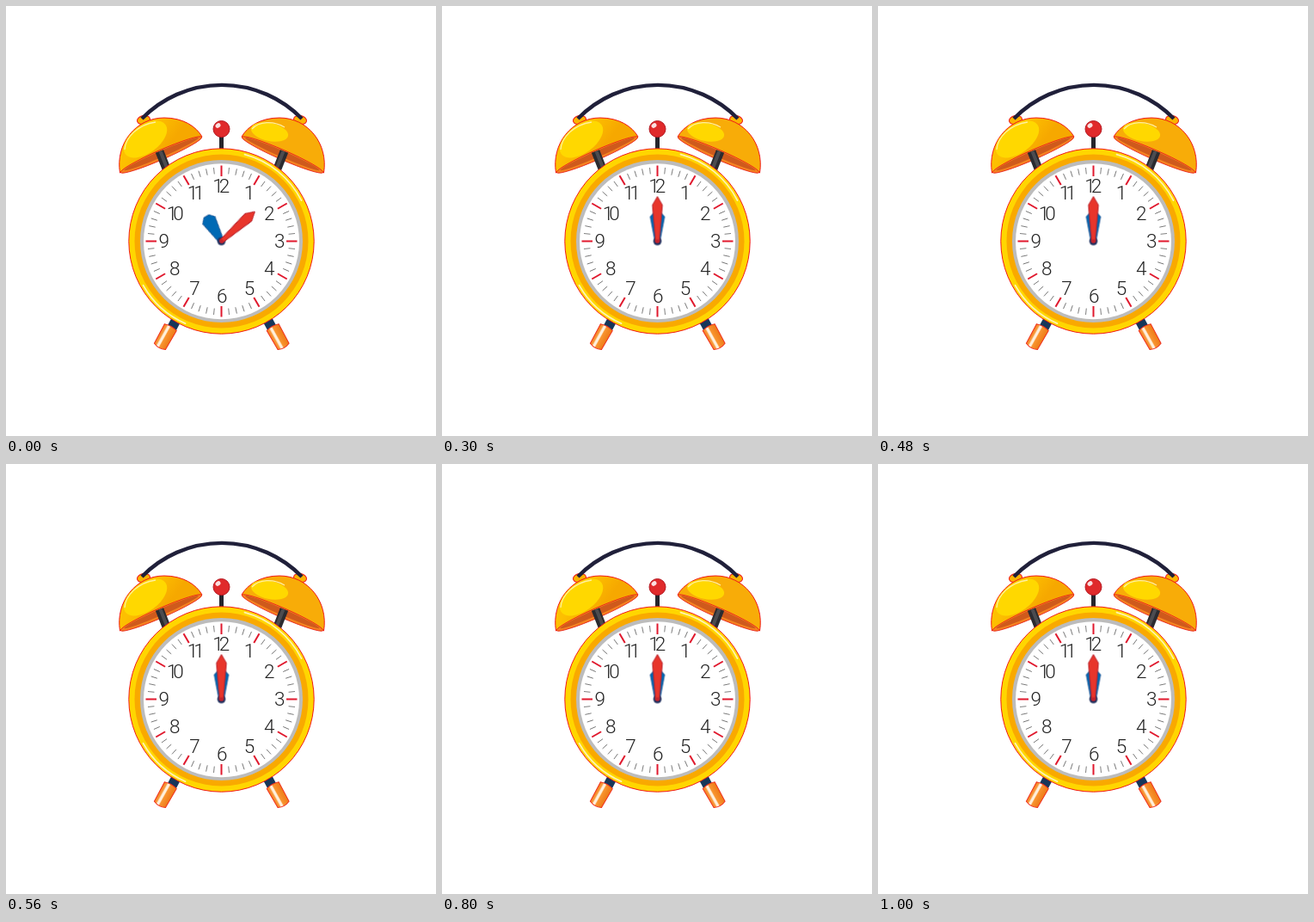
An HTML page for the animation above (1.2 s loop, 500x500 px).

```html
<!DOCTYPE html>
<html lang="en">
<head>
<meta charset="utf-8">
<title>Alarm clock</title>
<style>
  html, body { margin: 0; width: 100%; height: 100%; overflow: hidden; background: #fff; }
  svg { display: block; width: 100vw; height: 100vh; }
  text { font: 300 22.5px Roboto, "Open Sans", sans-serif; fill: #222; text-anchor: middle; }

  .minute { animation: minute 1200ms infinite; }
  .hour { animation: hour 1200ms infinite; }
  .bells { animation: shake 1200ms infinite; }

  @keyframes minute {
    0% { transform: rotate(48.5deg); animation-timing-function: steps(15); }
    25%, 100% { transform: rotate(360deg); }
  }
  @keyframes hour {
    0% { transform: rotate(-31deg); animation-timing-function: steps(15); }
    25%, 100% { transform: rotate(0deg); }
  }
  /* a swing every 40 ms, drawn in 20 ms steps */
  @keyframes shake {
    0%, 25% { transform: translateX(0); animation-timing-function: steps(2); }
    28.3333%, 35%, 41.6666%, 48.3333%, 55%, 61.6666%, 68.3333%, 75% {
      transform: translateX(-10px); animation-timing-function: steps(2);
    }
    31.6666%, 38.3333%, 45%, 51.6666%, 58.3333%, 65%, 71.6666%, 78.3333% {
      transform: translateX(10px); animation-timing-function: steps(2);
    }
    81.6666% { transform: translateX(-10px); animation-timing-function: steps(1); }
    83.3333%, 100% { transform: translateX(0); }
  }
</style>
</head>
<body>
<svg viewBox="0 0 500 500">
  <defs>
    <linearGradient id="metal">
      <stop offset="0" stop-color="#f47a1c"/>
      <stop offset=".2" stop-color="#f89a3c"/>
      <stop offset=".3" stop-color="#fff0dc"/>
      <stop offset=".42" stop-color="#fff0dc"/>
      <stop offset=".5" stop-color="#f89530"/>
      <stop offset="1" stop-color="#ee7a16"/>
    </linearGradient>
    <linearGradient id="gold" gradientUnits="userSpaceOnUse" x1="152" y1="142" x2="200" y2="178">
      <stop offset=".2" stop-color="#fdc000"/>
      <stop offset=".7" stop-color="#f6a800"/>
    </linearGradient>
    <path id="dome" d="M132.500 194C127 160 151 130 184 130C206 130 221 140 228 152Z"/>
    <g id="rim" transform="rotate(-23.6 180.5 173)">
      <ellipse cx="180.5" cy="173" rx="51.5" ry="5.6" fill="#f58220" stroke="#e8201c" stroke-width=".8"/>
      <ellipse cx="181" cy="172.2" rx="47" ry="3.6" fill="#cf5a1c"/>
    </g>
    <ellipse id="knob" cx="160" cy="132.5" rx="7.600" ry="5" transform="rotate(-12 160 132.5)"
      fill="#fbb400" stroke="#f01818"/>
    <g id="post">
      <path d="M178.500 169L188 193" stroke="#2b2b30" stroke-width="10"/>
      <path d="M179.500 169L188.500 192" stroke="#4c4c50" stroke-width="4"/>
    </g>
    <path id="neck" d="M200 361L192.500 375" stroke="#17375a" stroke-width="11.500"/>
    <path id="cap" d="M-8 -13Q0 -15.500 8 -13L7.500 12.500Q0 16 -7.500 12.500Z"/>
  </defs>

  <g class="bells" fill="none">
    <use href="#knob"/>
    <use href="#knob" transform="matrix(-1 0 0 1 502 0)"/>
    <path d="M158 131A130 130 0 0 1 344 131" stroke="#20203a" stroke-width="4.400"/>

    <use href="#dome" fill="url(#gold)" stroke="#f01818"/>
    <ellipse cx="162" cy="155" rx="29" ry="16" transform="rotate(-36 162 155)" fill="#ffd800"/>
    <path d="M138 167C139 153 153 138 174 135" stroke="#fff0a0" stroke-width="1.300"/>
    <use href="#rim"/>

    <g transform="matrix(-1 0 0 1 502 0)">
      <use href="#dome" fill="#f8ac08" stroke="#f01818"/>
      <use href="#rim"/>
    </g>
    <ellipse cx="306.500" cy="146.500" rx="22" ry="10.500" transform="rotate(12 306.500 146.500)" fill="#ffd800"/>
    <path d="M286 143C294 134 311 133 324 141" stroke="#fff0a0" stroke-width="1.300"/>
  </g>

  <use href="#post"/>
  <use href="#post" transform="matrix(-1 0 0 1 502 0)"/>

  <path d="M250.500 150V167" stroke="#25252c" stroke-width="5"/>
  <circle cx="250.500" cy="143" r="9.500" fill="#e02a2b" stroke="#b3161f"/>
  <ellipse cx="246.500" cy="139" rx="3.200" ry="2.500" fill="#fff" opacity=".85" transform="rotate(-35 246.500 139)"/>

  <use href="#neck"/>
  <use href="#neck" transform="matrix(-1 0 0 1 502 0)"/>
  <g fill="url(#metal)" stroke="#f02a1c" stroke-width=".9">
    <use href="#cap" transform="translate(185 385) rotate(29)"/>
    <use href="#cap" transform="translate(316.500 385) rotate(-29)"/>
  </g>

  <g transform="translate(250.500 273.500)">
    <circle r="107.700" fill="#ffd600" stroke="#f01818"/>
    <circle r="101" fill="#f9a900"/>
    <g fill="none" stroke="#fff3b0" stroke-width="1.800" stroke-linecap="round">
      <path d="M27 -100.800A104.400 104.400 0 0 1 93 -47.400"/>
      <path d="M-42 95.600A104.400 104.400 0 0 1 -91 51.200"/>
    </g>
    <circle r="94.500" fill="#bcbcbc"/>
    <circle cy=".3" r="90.500" fill="#fff"/>
    <g id="dial"></g>
    <g class="hour">
      <path d="M-3.500 -34H3.500L8.400 -28.500L3 0H-3L-8.400 -28.500Z" fill="#0069b4" stroke="#1b4f8f" stroke-width=".8"/>
    </g>
    <circle r="4.800" fill="#23315f"/>
    <g class="minute">
      <path d="M0 -52L5.800 -42L2 1H-2L-5.800 -42Z" fill="#e8352b" stroke="#b8202a"/>
    </g>
    <circle r="2.300" fill="#c4232e"/>
  </g>
</svg>
<script>
  const dial = document.getElementById("dial");

  function add(tag, attrs, label = "") {
    const node = document.createElementNS("http://www.w3.org/2000/svg", tag);
    for (const key in attrs) node.setAttribute(key, attrs[key]);
    node.textContent = label;
    dial.append(node);
  }

  for (let i = 0; i < 60; i++) {
    const major = i % 5 === 0;
    add("path", {
      d: major ? "M0 -88V-75.5" : "M0 -86V-78.5",
      stroke: major ? "#e0182d" : "#666",
      "stroke-width": major ? 2 : 0.8,
      transform: `rotate(${i * 6})`
    });
  }

  // 3 and 9 sit further out; tightened pairs need their ink recentred
  const nudge = { 3: 3.5, 9: -4, 10: -2, 11: -1.2, 12: -3.5 };
  for (let n = 1; n <= 12; n++) {
    const angle = n * Math.PI / 6;
    add("text", {
      x: 0.7 + 63.5 * Math.sin(angle) + (nudge[n] || 0),
      y: 7 - 64 * Math.cos(angle),
      "letter-spacing": n > 9 ? -5 : 0
    }, n);
  }
</script>
</body>
</html>
```
